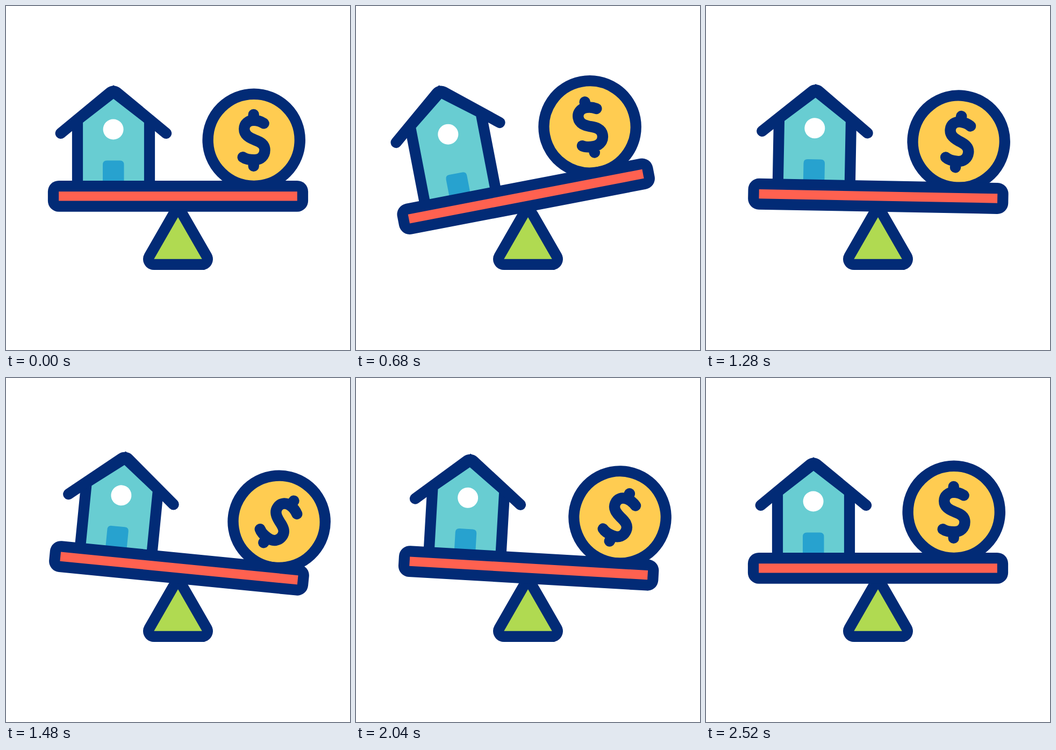
An HTML page for the animation above (2.6 s loop, 640 by 640 pixels).

```html
<!DOCTYPE html>
<html lang="en">
<head>
<meta charset="utf-8">
<title>House and coin on a seesaw</title>
<style>
  html, body { margin: 0; width: 100%; height: 100%; overflow: hidden; background: #fff; }
  svg { display: block; width: 100vw; height: 100vh; }
  .line { fill: none; stroke: #022b76; stroke-width: 20.4; stroke-linecap: round; stroke-linejoin: round; }
  .rim { stroke: #022b76; stroke-width: 40.6; stroke-linejoin: round; paint-order: stroke; }
</style>
</head>
<body>
<svg viewBox="0 0 640 640">
  <path class="rim" fill="#b0da51" d="M320 393L364.7 470.8H275.3Z"/>
  <g id="seesaw">
    <path id="walls" fill="#68cdd2" stroke="#022b76" stroke-width="20.2"/>
    <g id="roof">
      <path class="line" d="M101.8 236.8L193.5 161.1A10.2 10.2 0 0 1 206.5 161.1L298 236.8"/>
    </g>
    <circle id="window" cx="199.6" cy="229.5" r="19" fill="#fff"/>
    <path fill="#27a2cf" d="M180 335V295Q180 287.5 187.5 287.5H212Q219.5 287.5 219.5 295V335Z"/>
    <g id="coin">
      <circle class="line" style="fill:#ffcc51" r="85.6"/>
      <path class="line" d="M18.4 -31C12 -35 6 -36.5 0 -36.5C-11 -36.5 -18 -30 -18 -20.5C-18 -9.500 -9 -4.500 1 -.5C12 3.500 20.300 8 20.300 18.500C20.300 29 13 37 1 37C-8 37 -15 36 -20.500 32M-.5 -47.300V-37M-.5 37V48.500"/>
    </g>
    <rect class="rim" fill="#ff6150" x="98.200" y="345.200" width="443.600" height="17.300"/>
  </g>
</svg>
<script>
  const LOOP = 2600, STEP = 40;
  const STRETCH = 2.48;  // px of house growth per degree of left-down tilt
  const ROLL = 0.85;     // degrees of coin spin per px of slide

  // [ms, value], eased in and out between neighbours
  const TILT = [[0, 0], [70, 0], [770, 11.35], [790, 11.35], [1555, -6.05], [1610, -6.05], [2525, 0], [LOOP, 0]];
  const SLIDE = [[0, 0], [1175, 0], [1570, 40.5], [1630, 40.5], [2525, 0], [LOOP, 0]];

  const el = id => document.getElementById(id);
  const move = (id, value) => el(id).setAttribute('transform', value);

  function at(keys, t) {
    const i = keys.findIndex(k => k[0] > t);
    const [t0, v0] = keys[i - 1], [t1, v1] = keys[i];
    return v0 + (v1 - v0) * (1 - Math.cos(Math.PI * (t - t0) / (t1 - t0))) / 2;
  }

  function draw(t) {
    const tilt = at(TILT, t), slide = at(SLIDE, t);
    const lift = STRETCH * Math.max(0, tilt);
    move('seesaw', `rotate(${-tilt} 320 374)`);
    move('roof', `translate(0 ${-lift})`);
    move('window', `translate(0 ${-0.61 * lift})`);
    el('walls').setAttribute('d', `M133 338V${212 - lift}L200 ${160 - lift}L267 ${212 - lift}V338`);
    move('coin', `translate(${461.2 + slide} 249.3) rotate(${ROLL * slide})`);
  }

  const start = performance.now();
  function tick() {
    const t = (performance.now() - start) % LOOP;
    draw(Math.floor(t / STEP) * STEP);
    requestAnimationFrame(tick);
  }
  tick();
</script>
</body>
</html>
```
